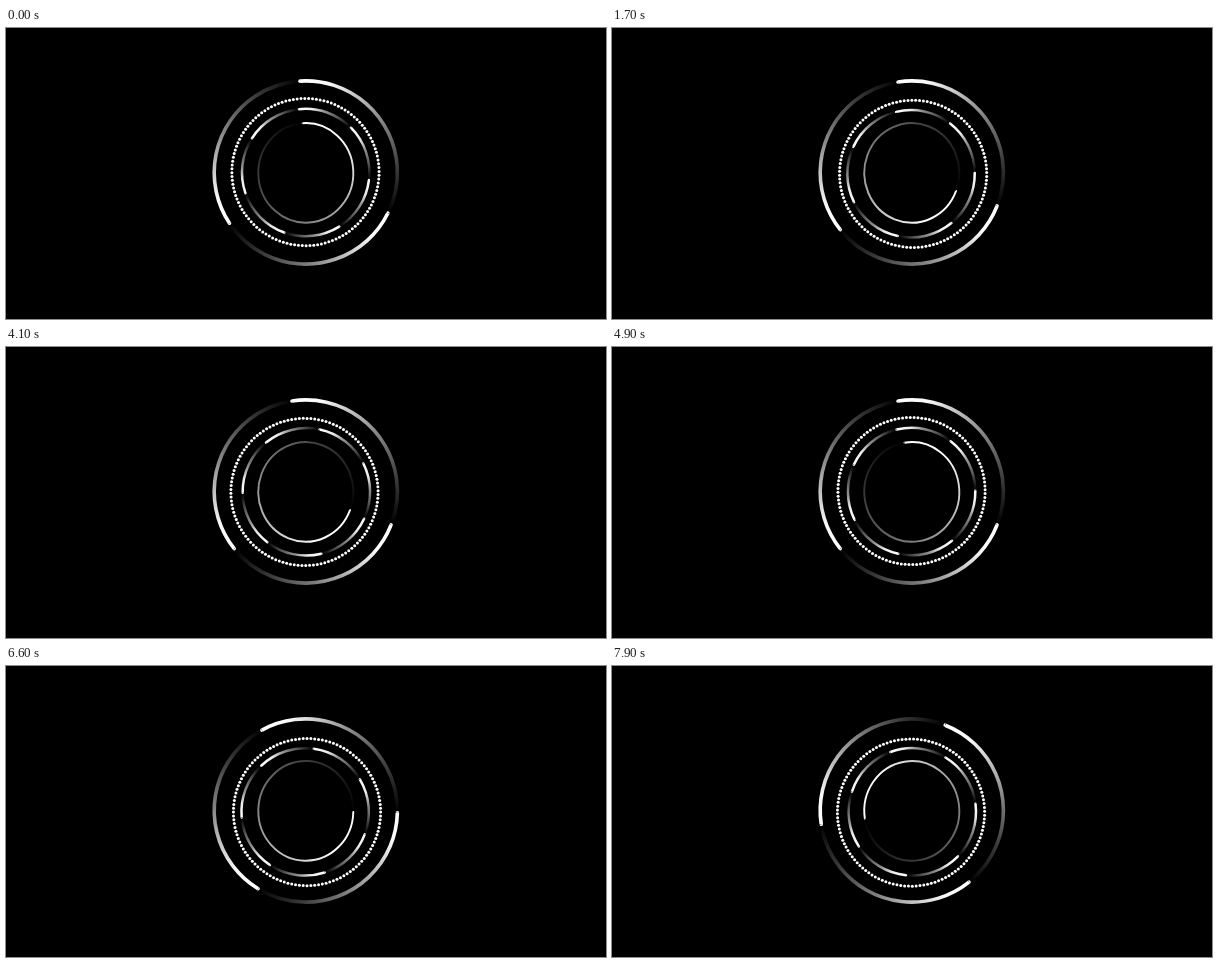
An HTML page with a canvas for the animation above (8 s loop, 600 by 291 pixels).

```html
<!DOCTYPE html>
<html lang="en">
<head>
<meta charset="utf-8">
<title>Rotating rings</title>
<style>
  html, body { margin: 0; width: 100%; height: 100%; overflow: hidden; background: #000; }
  canvas { display: block; width: 600px; height: 291px; }
</style>
</head>
<body>
<canvas id="stage" width="600" height="291"></canvas>
<script>
const ctx = document.getElementById('stage').getContext('2d');
const LOOP = 8000, STEP = 100;
const rad = deg => (deg - 90) * Math.PI / 180; // degrees run clockwise from the top

// Brightness along an arc, from its leading end to its tail.
const LINEAR = [[0, 1], [.15, .98], [.3, .78], [.5, .52], [.75, .24], [1, 0]];
const SHORT = [[0, 1], [.25, .92], [.45, .58], [.7, .35], [.9, .1], [1, 0]];

function comets({ x, y, rx, ry = rx, count, angle, width, fade, blur }) {
  const span = 360 / count;
  ctx.save();
  ctx.filter = `blur(${blur}px)`;
  ctx.translate(x, y);
  ctx.scale(1, ry / rx);
  ctx.lineWidth = width;
  for (let i = 0; i < count; i++) {
    const head = rad(angle + i * span);
    const paint = ctx.createConicGradient(head, 0, 0);
    for (const [at, alpha] of fade) {
      paint.addColorStop(at / count, `rgba(255,255,255,${alpha})`);
    }
    ctx.strokeStyle = paint;
    ctx.beginPath();
    ctx.arc(0, 0, rx, head, head + span * Math.PI / 180);
    ctx.stroke();
    // rounded leading end
    ctx.fillStyle = '#fff';
    ctx.beginPath();
    ctx.arc(rx * Math.cos(head), rx * Math.sin(head), width / 2, head - Math.PI, head);
    ctx.fill();
  }
  ctx.restore();
}

function dots(x, y, r, count, angle, size) {
  ctx.fillStyle = '#fff';
  for (let i = 0; i < count; i++) {
    const a = rad(angle + i * 360 / count);
    ctx.beginPath();
    ctx.arc(x + r * Math.cos(a), y + r * Math.sin(a), size, 0, 7);
    ctx.fill();
  }
}

function draw(ms) {
  const n = Math.floor(ms % LOOP / STEP);
  const tick = n ? 3 * n - n % 2 : 1; // uneven 30 fps cadence
  const slow = 2.5 * tick;
  const drift = rad(slow - 16), sway = rad(-slow);

  ctx.fillStyle = '#000';
  ctx.fillRect(0, 0, 600, 291);

  comets({ x: 299.8, y: 144.5, rx: 91.6, count: 3, angle: 1.4 - 5 * tick,
           width: 3.6, fade: LINEAR, blur: .5 });
  dots(299.8 + 1.4 * Math.cos(drift), 145.4 + 1.4 * Math.sin(drift), 73.6, 120, slow, 1.5);
  comets({ x: 299.7 + .8 * Math.cos(sway), y: 145.3 + .8 * Math.sin(sway), rx: 63.7,
           count: 7, angle: 1.4 - 7.5 * tick, width: 2.5, fade: SHORT, blur: .4 });
  comets({ x: 299.8, y: 144.9, rx: 47.5, ry: 49.8, count: 1, angle: 1.2 - 5 * tick,
           width: 1.9, fade: LINEAR, blur: .3 });
}

const start = performance.now();
(function frame() {
  draw(performance.now() - start);
  requestAnimationFrame(frame);
})();
</script>
</body>
</html>
```
